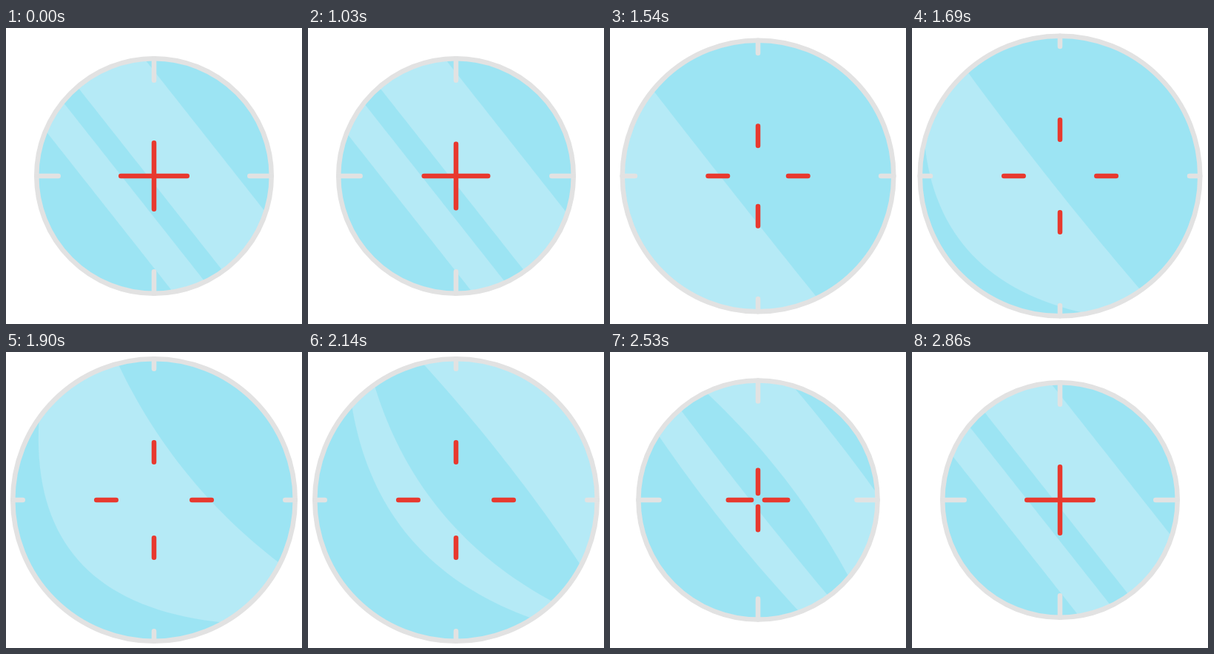
Animation of 400x400 px, one loop 2890 ms. Source, as an HTML page with a canvas:

```html
<!DOCTYPE html>
<html lang="en">
<head>
<meta charset="utf-8">
<title>Crosshair lens</title>
<style>
  html, body { margin: 0; width: 100%; height: 100%; overflow: hidden; background: #fff; }
  canvas { display: block; width: 100vmin; height: 100vmin; }
</style>
</head>
<body>
<canvas id="stage"></canvas>
<script>
const SIZE = 400, MID = 200, LOOP = 2890, HOLD = 1030, STEP = 30;
const GLASS = '#9ce4f3', SHINE = '#b5eaf6', RIM = '#e2e2e2', RED = '#e8392f';
const STROKE = 6.5;

const canvas = document.getElementById('stage');
const ctx = canvas.getContext('2d');
const ratio = Math.max(1, window.devicePixelRatio || 1);
canvas.width = canvas.height = SIZE * ratio;

// Edges of the two reflections: distance from the centre and bend (1/10000) at each time.
const TIMES = [1000, 1030, 1360, 1500, 1690, 1900, 2260, 2350, 2620, 2860];
const EDGES = [
  { pos: [-77, -80, -230, -250, -250, -240, -28, -33, -66, -77], bend: [0, 0, 0, 10, 20, 20, 12, 8, 1, 0] },
  { pos: [-34.5, -36.7, -205, -230, -230, -215, 36, 31.5, -24, -34.5], bend: [0, 0, 0, 5, 15, 20, 6, 4.5, 0, 0] },
  { pos: [-6.5, -7, -185, -205, -160, -131, 152, 143.5, 10, -6.5], bend: [0, 0, 0, 12, 23, 26, -12, -12, -2, 0] },
  { pos: [88, 86.5, -26, -42, -14, 57, 225, 215, 104, 88], bend: [0, 0, -2, 0, 1, 7, -5, -5, -1, 0] }
];

const clamp = x => Math.min(1, Math.max(0, x));
const span = (t, from, length) => clamp((t - from) / length);
const easeInOut = (x, power) =>
  x < 0.5 ? 0.5 * (2 * x) ** power : 1 - 0.5 * (2 - 2 * x) ** power;

// Smooth curve through the values, without overshoot.
function curve(values, t) {
  const last = TIMES.length - 1;
  if (t <= TIMES[0]) return values[0];
  if (t >= TIMES[last]) return values[last];
  const gap = i => TIMES[i + 1] - TIMES[i];
  const rise = i => (values[i + 1] - values[i]) / gap(i);
  const slope = i => {
    if (i === 0 || i === last) return 0;
    const a = rise(i - 1), b = rise(i);
    return a * b <= 0 ? 0 : 2 * a * b / (a + b);
  };
  let i = 0;
  while (t >= TIMES[i + 1]) i++;
  const h = gap(i), x = (t - TIMES[i]) / h, y = 1 - x;
  return values[i] * (1 + 2 * x) * y * y + slope(i) * h * x * y * y
       + values[i + 1] * x * x * (3 - 2 * x) - slope(i + 1) * h * x * x * y;
}

// Opens to 1 and closes again.
const pulse = (t, open, close) =>
  easeInOut(span(t, open, 890), 2.7) - easeInOut(span(t, close, 495), 2.7);

function edgePoints(edge, t) {
  const pos = curve(edge.pos, t), bend = curve(edge.bend, t) / 1e4;
  const points = [];
  for (let u = -260; u <= 260; u += 10) {
    const s = pos + bend * (u + 10) ** 2;
    points.push([MID + 0.785 * s + 0.62 * u, MID - 0.62 * s + 0.785 * u]);
  }
  return points;
}

function fillBand(low, high, t) {
  ctx.beginPath();
  for (const [x, y] of [...edgePoints(low, t), ...edgePoints(high, t).reverse()]) ctx.lineTo(x, y);
  ctx.fill();
}

function disc(radius) {
  ctx.beginPath();
  ctx.arc(MID, MID, radius, 0, 2 * Math.PI);
}

// Four equal strokes pointing away from the centre.
function spokes(from, to, color) {
  ctx.strokeStyle = color;
  ctx.beginPath();
  for (const [dx, dy] of [[1, 0], [0, 1], [-1, 0], [0, -1]]) {
    ctx.moveTo(MID + dx * from, MID + dy * from);
    ctx.lineTo(MID + dx * to, MID + dy * to);
  }
  ctx.stroke();
}

function draw(t) {
  const open = pulse(t, 985, 2165);
  const radius = 162 + 32 * open - STROKE / 2;
  const cap = STROKE / 2;

  ctx.setTransform(ratio, 0, 0, ratio, 0, 0);
  ctx.fillStyle = '#fff';
  ctx.fillRect(0, 0, SIZE, SIZE);
  ctx.lineWidth = STROKE;
  ctx.lineCap = 'round';

  ctx.save();
  disc(radius);
  ctx.clip();
  ctx.fillStyle = GLASS;
  ctx.fillRect(0, 0, SIZE, SIZE);
  ctx.fillStyle = SHINE;
  fillBand(EDGES[0], EDGES[1], t);
  fillBand(EDGES[2], EDGES[3], t);
  ctx.restore();

  disc(radius);
  ctx.strokeStyle = RIM;
  ctx.stroke();
  spokes(126 + 48 * open + cap, radius, RIM);

  const inner = 48 * pulse(t, 975, 2180);
  const shrink = 1 - (1 - span(t, 1000, 540)) ** 2 - easeInOut(span(t, 2350, 450), 2);
  spokes(inner + cap, inner + 48 - 15 * shrink - cap, RED);
}

const start = performance.now();
function tick() {
  const t = (performance.now() - start) % LOOP;
  draw(t < HOLD ? 0 : HOLD + STEP * Math.floor((t - HOLD) / STEP));
  requestAnimationFrame(tick);
}
tick();
</script>
</body>
</html>
```
